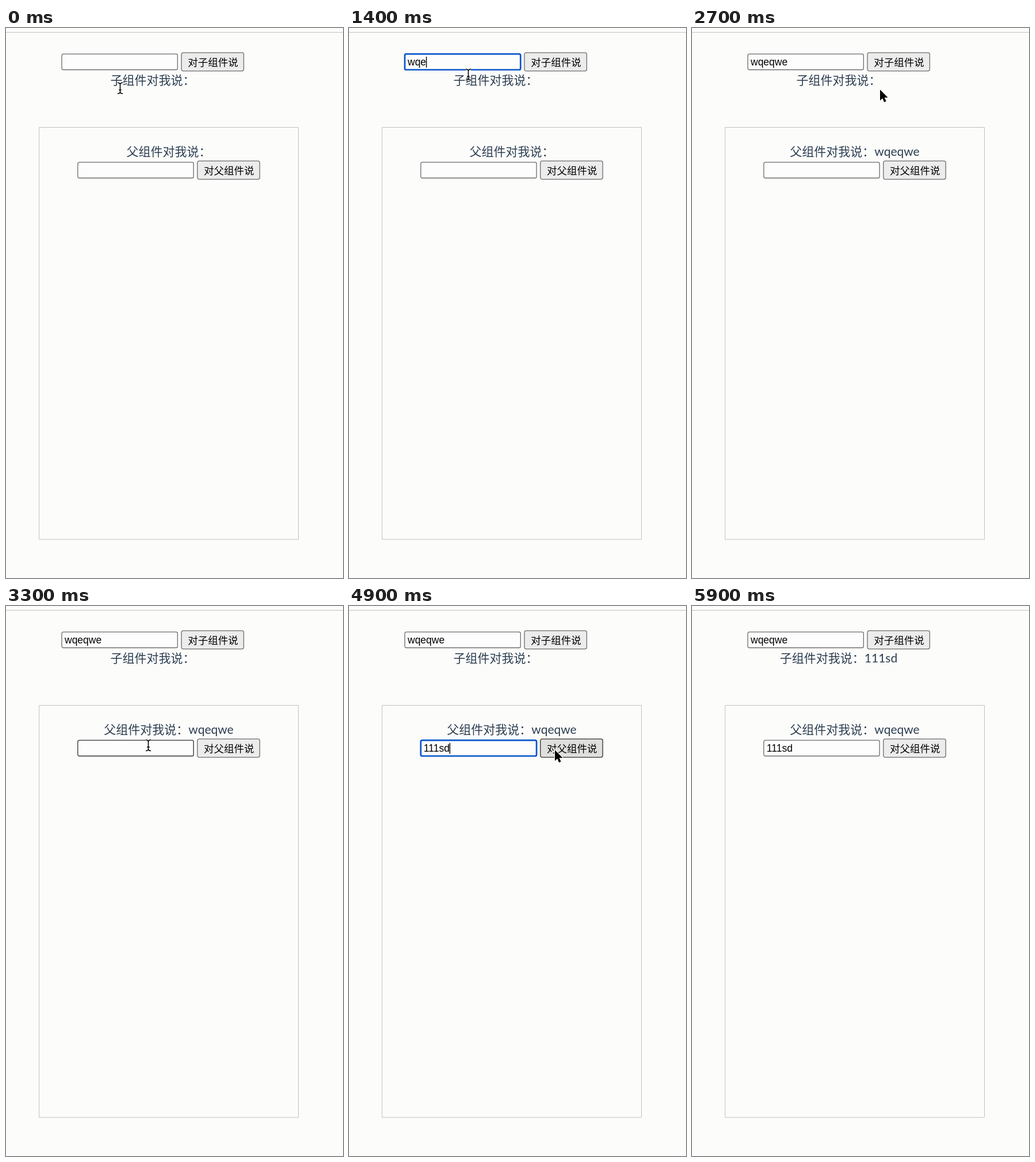
Write an HTML page that moves like this. It is 586 px wide and 955 px high and loops after 6000 ms.

```html
<!DOCTYPE html>
<html lang="zh-CN">
<head>
<meta charset="utf-8">
<title>父子组件通信</title>
<style>
  html, body { margin: 0; width: 100%; height: 100%; overflow: hidden; background: #fcfcfb; }
  svg { display: block; }
  .line { fill: none; stroke: #c3c3b9; }
  .label { font: 21px Lato, "Noto Sans CJK SC", "Noto Sans CJK", sans-serif; fill: #2c3e50; text-anchor: middle; }
  .field rect, .button rect { stroke: #6c6c6c; stroke-width: 1.3; }
  .field rect { fill: #fdfdfd; }
  .field text { font: 17.5px "Liberation Sans", Arial, sans-serif; }
  .button rect { fill: #ececec; }
  .button text { font: 17.5px "Noto Sans CJK SC", "Noto Sans CJK", sans-serif; text-anchor: middle; }
  .hover rect { stroke: #303030; }
  .button.hover rect { fill: #dfdfdd; }
  .field.focus rect { stroke: #0a55cc; stroke-width: 2.7; }
  .caret { stroke: #000; stroke-width: 1.4; }
</style>
</head>
<body>
<svg width="586" height="955" viewBox="0 0 586 955">
  <path class="line" d="M0 7.5H586M57.5 172.5H508.5V888H57.5Z"/>

  <text class="label" id="parentLabel" x="255" y="98.3"></text>
  <g class="field" id="parentField" transform="translate(97 45.2)">
    <rect width="201.3" height="27.3" rx="2.6"/><text x="5" y="20"></text><path class="caret" d="M0 4.5V23.5"/>
  </g>
  <g class="button" id="parentButton" transform="translate(305 42.8)">
    <rect width="108.4" height="31.8" rx="3"/><text x="55" y="22.8">对子组件说</text>
  </g>

  <text class="label" id="childLabel" x="283" y="222.3"></text>
  <g class="field" id="childField" transform="translate(124.8 233.2)">
    <rect width="201.3" height="27.3" rx="2.6"/><text x="5" y="20"></text><path class="caret" d="M0 4.5V23.5"/>
  </g>
  <g class="button" id="childButton" transform="translate(332.8 230.8)">
    <rect width="108.4" height="31.8" rx="3"/><text x="55" y="22.8">对父组件说</text>
  </g>

  <g id="pointer">
    <path id="arrow" d="M0 0V19L4.3 15.1L7.1 21.8L10.6 20.3L7.8 13.8H13.6Z" stroke="#fff" stroke-width="2" paint-order="stroke"/>
    <g id="beam" fill="none">
      <path stroke="#fff" stroke-width="3.4" d="M-4.5 -9.5Q0 -9.5 0 -6Q0 -9.5 4.5 -9.5M0 -6V6M-4.5 9.5Q0 9.5 0 6Q0 9.5 4.5 9.5"/>
      <path stroke="#000" stroke-width="1.6" d="M-4.5 -9.5Q0 -9.5 0 -6Q0 -9.5 4.5 -9.5M0 -6V6M-4.5 9.5Q0 9.5 0 6Q0 9.5 4.5 9.5M-2.3 3H2.3"/>
    </g>
  </g>
</svg>
<script>
const LOOP = 6000, STEP = 100, BLINK = 500;
const $ = id => document.getElementById(id);

// Pointer way points: time, x, y
const path = [
  [0, 198.5, 104.5], [300, 200, 97], [700, 203, 84], [800, 203, 66], [1100, 204, 63],
  [1400, 207.5, 81], [1700, 215, 84], [2000, 310, 74], [2200, 345, 60], [2500, 345, 61],
  [2800, 318, 130], [3200, 250, 238], [3300, 247.5, 242], [3700, 248, 243], [3900, 300, 262],
  [4100, 343, 254], [4300, 343, 254], [4600, 350, 257], [4900, 358, 250], [5200, 358, 250],
  [5400, 430, 238], [5600, 545, 200], [5800, 625, 170], [6000, 625, 170]
];

const fields = [
  { el: $("parentField"), focus: 900, blur: 2400, text: "wqeqwe", keys: [1000, 1100, 1300, 1500, 1600, 1700] },
  { el: $("childField"), focus: 3400, blur: 5200, text: "111sd", keys: [3600, 3700, 3900, 4500, 4700] }
];

// Hit areas: left, top, right, bottom
const areas = [
  { el: $("parentField"), box: [96, 45, 299, 73], beam: true },
  { el: $("childField"), box: [124, 233, 327, 261], beam: true },
  { el: $("parentButton"), box: [304, 42, 414, 75] },
  { el: $("childButton"), box: [332, 230, 442, 263] },
  { box: [181, 75, 329, 106], beam: true },
  { box: [169, 202, 397, 229], beam: true }
];

function pointerAt(t) {
  const i = path.findIndex(p => p[0] > t);
  const [t0, x0, y0] = path[i - 1], [t1, x1, y1] = path[i];
  const k = (t - t0) / (t1 - t0);
  return [x0 + (x1 - x0) * k, y0 + (y1 - y0) * k];
}

function drawField({ el, focus, blur, text, keys }, t) {
  const past = keys.filter(k => k <= t);
  const label = el.querySelector("text"), caret = el.querySelector(".caret");
  const active = t >= focus && t < blur;
  const since = t - (past.length ? past[past.length - 1] : focus);
  label.textContent = text.slice(0, past.length);
  const end = 5.5 + (past.length ? label.getComputedTextLength() : 0);
  caret.setAttribute("transform", `translate(${end} 0)`);
  caret.style.display = active && since % (2 * BLINK) < BLINK ? "" : "none";
  el.classList.toggle("focus", active);
}

function drawPointer(t) {
  const [x, y] = pointerAt(t);
  let beam = false;
  for (const { el, box: [l, top, r, b], beam: isText } of areas) {
    const over = x >= l && x <= r && y >= top && y <= b;
    if (el) el.classList.toggle("hover", over);
    if (over && isText) beam = true;
  }
  $("pointer").setAttribute("transform", `translate(${x} ${y})`);
  $("beam").style.display = beam ? "" : "none";
  $("arrow").style.display = beam ? "none" : "";
}

function draw(t) {
  fields.forEach(f => drawField(f, t));
  $("childLabel").textContent = "父组件对我说：" + (t >= fields[0].blur ? fields[0].text : "");
  $("parentLabel").textContent = "子组件对我说：" + (t >= fields[1].blur ? fields[1].text : "");
  drawPointer(t);
}

const start = performance.now();
let last = -1;
function tick() {
  const t = Math.floor(((performance.now() - start) % LOOP) / STEP) * STEP;
  if (t !== last) draw(last = t);
  requestAnimationFrame(tick);
}
tick();
</script>
</body>
</html>
```
